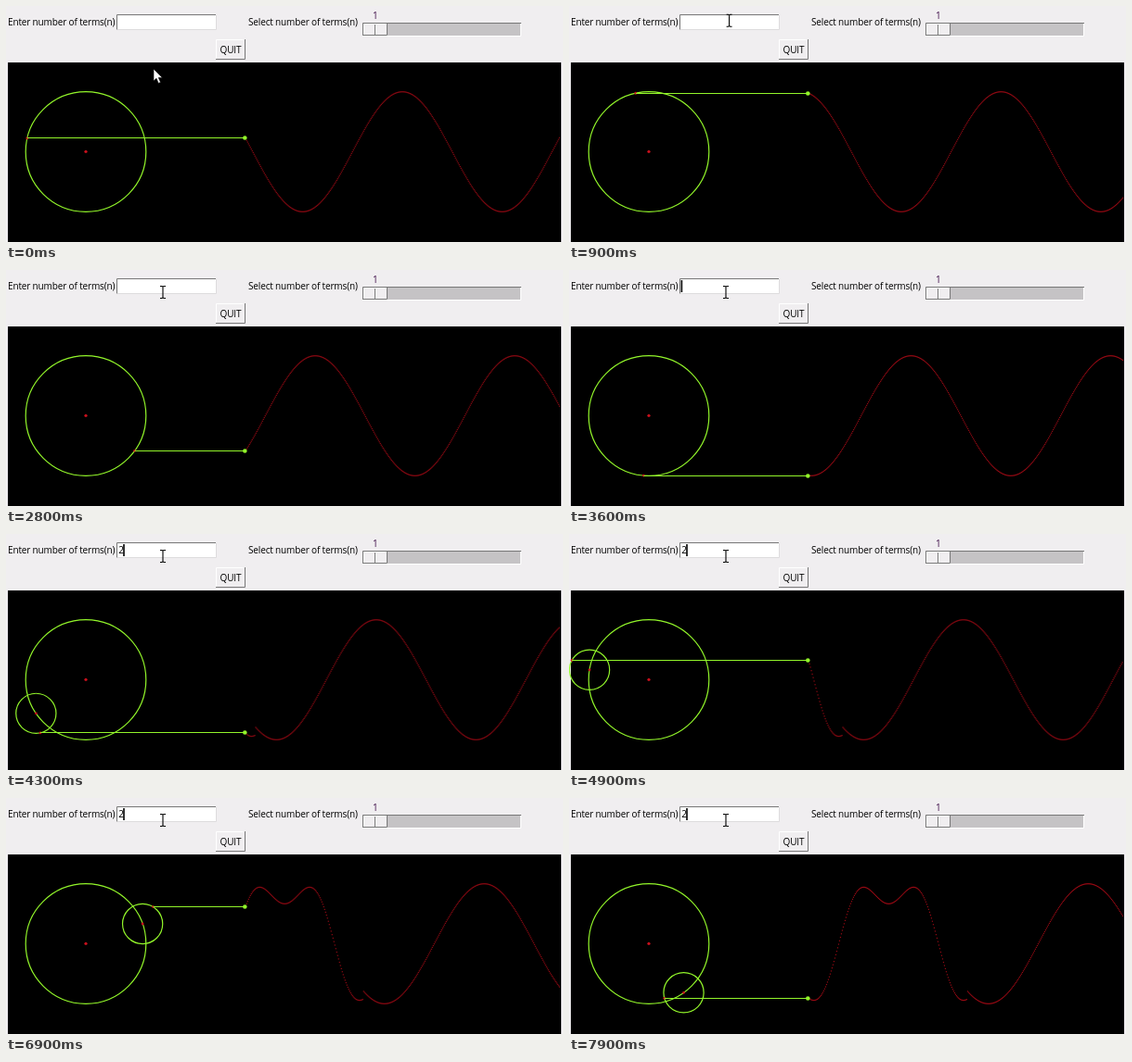
An HTML page with a canvas for the animation above (8000 ms loop, 600x255 px).

```html
<!DOCTYPE html>
<html lang="en">
<head>
<meta charset="utf-8">
<title>Fourier terms</title>
<style>
  html, body { margin: 0; width: 100%; height: 100%; overflow: hidden; background: #f0eef0; }
  canvas, svg { position: absolute; left: 0; top: 0; width: 600px; height: 255px; }
  text { font: 10px "Open Sans", "Noto Sans", sans-serif; letter-spacing: -.15px; fill: #000; }
  .dark { fill: none; stroke: #777; }
  .light { fill: none; stroke: #fff; }
  .ring, #arm { fill: none; stroke: #92f52a; stroke-width: 1.2; }
  .hub { fill: #c8101c; }
</style>
</head>
<body>
<canvas id="trace" width="600" height="255"></canvas>
<svg viewBox="0 0 600 255">
  <text x="2" y="21">Enter number of terms(n)</text>
  <rect x="119" y="9" width="107" height="17" fill="#fff"/>
  <path class="dark" d="M119.5 25.5V9.5H226"/>
  <path d="M120 25.5H226.5V10" fill="none" stroke="#dddbdd"/>
  <text id="typed" x="121.3" y="21">2</text>
  <rect id="caret" y="11" width="1.6" height="13"/>

  <text x="261" y="21">Select number of terms(n)</text>
  <text x="395" y="14" style="fill:#3c0a46">1</text>
  <rect x="384" y="18" width="171" height="14" fill="#c5c3c5"/>
  <path class="dark" d="M384.5 32V18.5H555"/>
  <path class="light" d="M384 32.5H554.5V19"/>
  <rect x="385" y="19" width="26" height="13" fill="#f0eef0"/>
  <path class="light" d="M385.5 31V19.5H410M398.5 20V31"/>
  <path class="dark" d="M385 31.5H410.5V19M397.5 20V31"/>

  <rect x="226" y="36" width="32" height="22" fill="#f0eef0"/>
  <path class="light" d="M226.5 57V36.5H257"/>
  <path class="dark" d="M226 57.5H257.5V36"/>
  <text x="230.5" y="50.5">QUIT</text>

  <circle class="ring" cx="86" cy="157.5" r="64.8"/>
  <circle class="hub" cx="86" cy="157.3" r="1.6"/>
  <g id="second">
    <circle class="ring" r="21.6"/>
    <circle class="hub" r="1.4"/>
  </g>
  <circle id="tip" class="hub" r="1.4"/>
  <path id="arm"/>
  <circle id="pen" cx="257.3" r="2.3" fill="#92f52a"/>

  <path id="arrow" d="M0 0V13L3 10.2L5.2 15.4L7.5 14.4L5.3 9.4H9.4Z" fill="#fff" stroke="#000" stroke-width=".6"/>
  <path id="beam" d="M-3 -6.5H-1L0 -5.7L1 -6.5H3M0 -5.7V5.7M-3 6.5H-1L0 5.7L1 6.5H3" fill="none" stroke="#000" stroke-width="1.1"/>
</svg>
<script>
const LOOP = 8000, STEP = 100;
const CX = 86, CY = 157.5, R = 64.8;
const TRACE_X = 258, PX_PER_DEG = 0.597, DOT_DEG = 1.675;
const SWITCH_DEG = 488;   // angle at which the second term joins
const TYPED_AT = 4000, FOCUS_AT = 3100;

// [time, angle in degrees]
const SPIN = [[0, 193], [1900, 329], [3600, 455], [4900, 549.5],
  [5700, 608.4], [6900, 700.6], [7900, 774.6]];
// [time, x, y]
const MOUSE = [[0, 159, 68], [300, 161, 60], [800, 172, 16],
  [1300, 175, 15], [1900, 172, 24], [2700, 169, 24], [8000, 169, 24]];

const $ = id => document.getElementById(id);
const ctx = $("trace").getContext("2d");

function at(keys, t, col) {
  let i = 1;
  while (i < keys.length - 1 && keys[i][0] < t) i++;
  const a = keys[i - 1], b = keys[i];
  return a[col] + (b[col] - a[col]) * (t - a[0]) / (b[0] - a[0]);
}

const terms = deg => deg < SWITCH_DEG ? 1 : 2;

// End point of the first `count` odd harmonics
function reach(deg, count) {
  let x = CX, y = CY;
  for (let i = 0; i < count; i++) {
    const n = 2 * i + 1, a = n * deg * Math.PI / 180;
    x += R / n * Math.cos(a);
    y += R / n * Math.sin(a);
  }
  return [x, y];
}

function show(id, on) {
  $(id).style.display = on ? "" : "none";
}

function place(id, x, y) {
  $(id).setAttribute("transform", `translate(${x} ${y})`);
}

function drawTrace(deg) {
  ctx.fillStyle = "#000";
  ctx.fillRect(2, 61, 596, 194);
  ctx.fillStyle = "#960a14";
  for (let k = Math.floor(deg / DOT_DEG); ; k--) {
    const d = k * DOT_DEG;
    const x = TRACE_X + (deg - d) * PX_PER_DEG;
    if (x > 597) break;
    const y = reach(d, terms(d))[1];
    ctx.fillRect(x - .6, y - .6, 1.2, 1.2);
  }
}

function drawWheels(deg) {
  const count = terms(deg);
  const [x, y] = reach(deg, count);
  show("second", count > 1);
  place("second", ...reach(deg, 1));
  place("tip", x, y);
  const row = Math.floor(y) + .5;
  $("arm").setAttribute("d", `M${Math.max(x, 2)} ${row}H257`);
  $("pen").setAttribute("cy", row);
}

function drawInput(t) {
  const typed = t >= TYPED_AT;
  show("typed", typed);
  show("caret", t >= FOCUS_AT && (t - FOCUS_AT) % 900 < 600);
  $("caret").setAttribute("x", typed ? 126.2 : 120.6);
  const x = at(MOUSE, t, 1), y = at(MOUSE, t, 2);
  const inside = y < 26;
  show("arrow", !inside);
  show("beam", inside);
  place(inside ? "beam" : "arrow", x, y);
}

const start = performance.now();
function frame() {
  const now = Math.max(0, performance.now() - start) % LOOP;
  const t = Math.floor(now / STEP) * STEP;
  const deg = at(SPIN, t, 1);
  drawTrace(deg);
  drawWheels(deg);
  drawInput(t);
  requestAnimationFrame(frame);
}
frame();
</script>
</body>
</html>
```
